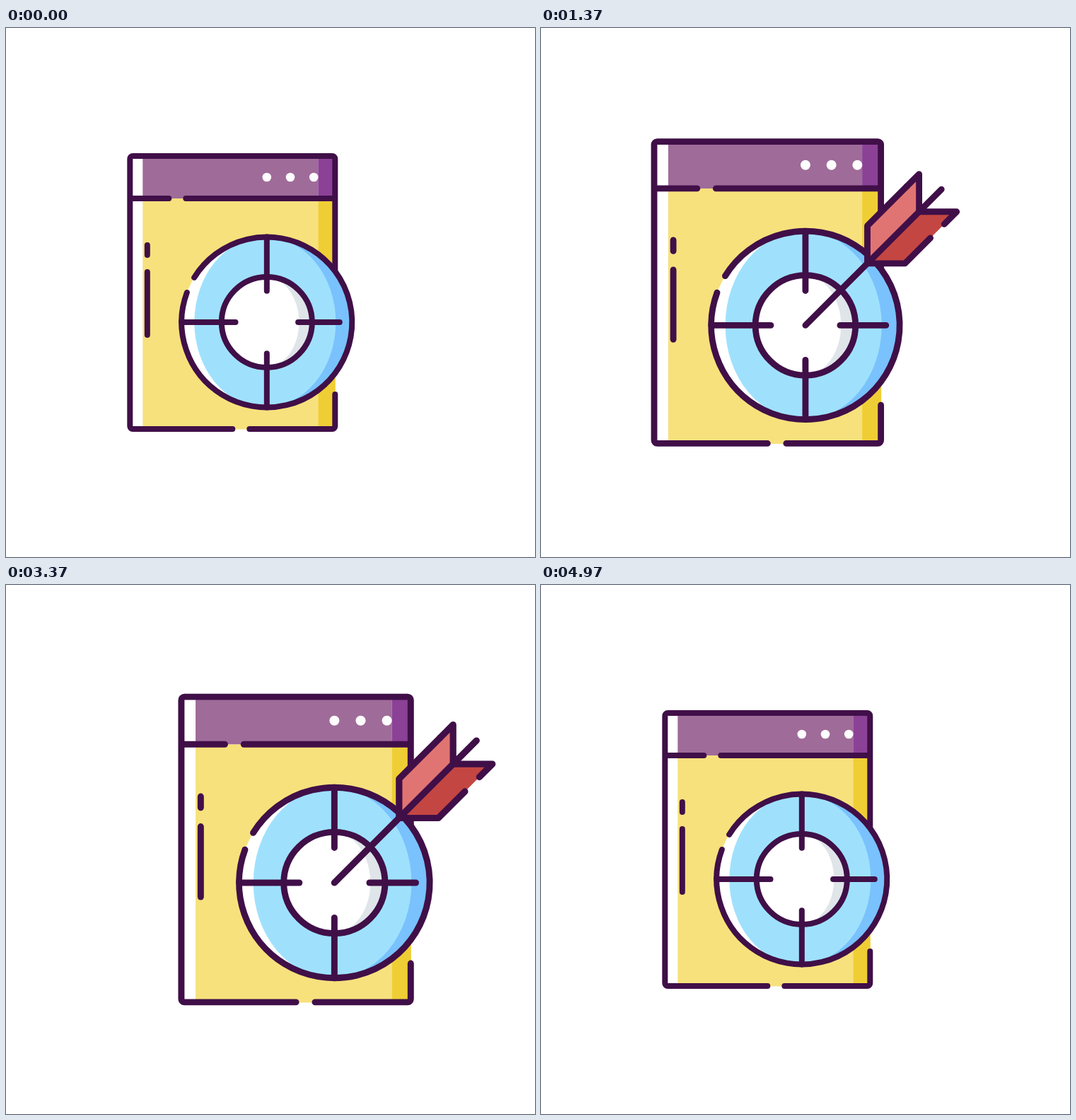
An HTML page with a canvas that plays this animation: 748 px wide and 748 px high, repeating every 5030 ms.

```html
<!DOCTYPE html>
<html lang="en">
<head>
<meta charset="utf-8">
<title>Target</title>
<style>
html, body { margin: 0; width: 100%; height: 100%; overflow: hidden; background: #fff; }
canvas { display: block; width: 748px; height: 748px; }
</style>
</head>
<body>
<canvas id="stage" width="748" height="748"></canvas>
<script>
const ctx = document.getElementById('stage').getContext('2d');
const LOOP = 5030, INK = '#400f48', RIGHT = Math.PI / 2;
const RING = 120.5, HUB = 64;

// Sine step from 0 to 1 between two times
function ease(t, from, to) {
  const u = Math.min(1, Math.max(0, (t - from) / (to - from)));
  return (1 - Math.cos(Math.PI * u)) / 2;
}
// Rises to 1, holds, falls back to 0
function pulse(t, from, top, leave = top, to = 2 * top - from) {
  return ease(t, from, top) - ease(t, leave, to);
}

function group(x, y, scale, angle, draw) {
  ctx.save();
  ctx.translate(x, y);
  ctx.scale(scale, scale);
  ctx.rotate(angle);
  draw();
  ctx.restore();
}
function trace(points) {
  ctx.beginPath();
  for (let i = 0; i < points.length; i += 2) ctx.lineTo(points[i], points[i + 1]);
}
function line(...points) {
  trace(points);
  ctx.stroke();
}
function box(color, x, y, w, h) {
  ctx.fillStyle = color;
  ctx.fillRect(x, y, w, h);
}
function oval(color, x, rx, ry, from = 0, to = 4 * RIGHT) {
  ctx.beginPath();
  ctx.ellipse(x, 0, rx, ry, 0, from, to);
  ctx.fillStyle = color;
  ctx.fill();
}
function arc(radius, from = 0, to = 4 * RIGHT) {
  ctx.beginPath();
  ctx.arc(0, 0, radius, from, to);
  ctx.stroke();
}

function drawCard(t) {
  const left = 175, right = 465, top = 181, bar = 241, bottom = 567;
  const lit = 193, shade = 441;
  box('#fff', left, top, lit - left, bottom - top);
  box('#f7e17c', lit, bar, shade - lit, bottom - bar + .5);
  box('#efce35', shade, bar, right - shade + .5, bottom - bar + .5);
  box('#9f6b99', lit, top, shade - lit, bar - top);
  box('#8b4196', shade, top, right - shade, bar - top);

  ctx.beginPath();
  ctx.moveTo(320, bottom);
  ctx.arcTo(left, bottom, left, top, 4);
  ctx.arcTo(left, top, right, top, 4);
  ctx.arcTo(right, top, right, bottom, 4);
  ctx.lineTo(right, 350);
  ctx.moveTo(right, 518);
  ctx.arcTo(right, bottom, left, bottom, 4);
  ctx.lineTo(344, bottom);
  ctx.stroke();
  line(left + 2, bar, 230, bar);
  line(254, bar, right - 2, bar);

  const lift = 9.5 * pulse(t, 560, 760, 900, 1090);
  line(199.5, 307 - lift, 199.5, 321 - lift);
  line(199.5, 345 - lift, 199.5, 434 - lift);

  for (let i = 0; i < 3; i++) {
    const start = 720 + 90 * i;
    const size = 1 - .65 * pulse(t, start, start + 200);
    group(368.5 + 33.2 * i, 211, size, 0, () => oval('#fff', 0, 6.3, 6.3));
  }
}

function drawTarget(focus) {
  oval('#fff', 0, RING, RING);
  oval('#79c2fd', 0, RING, RING, -RIGHT, RIGHT);
  oval('#9fe1fd', -2.5, 100, RING);
  arc(RING, 2.351 * RIGHT, 6.226 * RIGHT);

  group(0, 0, 1 + .2 * focus, 0, () => {
    oval('#fff', 0, HUB, HUB);
    oval('#dfe5e9', 0, HUB, HUB, -RIGHT, RIGHT);
    oval('#fff', -2, 47.5, HUB);
    arc(HUB);
  });

  const shift = 22.5 * focus;
  for (let i = 0; i < 4; i++) {
    const end = i ? RING : 103;
    group(0, 0, 1, i * RIGHT, () => line(44.3 - shift, 0, end - shift, 0));
  }
}

// Drawn along the x axis with the tip at 0
function drawArrow() {
  const wing = 34, base = 112, notch = 205.5;
  for (const side of [-1, 1]) {
    const edge = side * wing;
    trace([base, 0, base + wing, edge, notch + wing, edge, notch, 0]);
    ctx.fillStyle = side < 0 ? '#e07472' : '#c44642';
    ctx.fill();
    const gap = side < 0 ? 0 : 25;
    line(base, 0, base + wing, edge, 217 - gap, edge);
    line(217, edge, notch + wing, edge, notch, 0);
  }
  line(0, 0, 246, 0);
}

function drawSparkles(t) {
  const spots = [[271, 283], [551.5, 447.5], [527.5, 374.5], [509, 526.5]];
  ctx.lineWidth = 3;
  spots.forEach(([x, y], i) => {
    const start = 710 + 50 * i, size = pulse(t, start, start + 200);
    if (size > 0) group(x, y, size, 0, () => {
      line(-6, 0, 6, 0);
      line(0, -6, 0, 6);
    });
  });
}

function render(t) {
  const zoom = 1 + .22 * ease(t, 20, 540) - .12 * ease(t, 540, 870) + .016 * ease(t, 870, 2110)
    + .16 * (pulse(t, 2110, 2660, 2860, 3415) + ease(t, 3580, 4130)) - .276 * ease(t, 4230, 4970);
  const x = 320.3 + 90 * pulse(t, 2110, 3410, 3570, 4910);
  const focus = pulse(t, 300, 700, 880, 1060);
  const grow = 1 + .17 * focus;
  const swell = 1 + .155 * pulse(t, 2110, 2800, 2800, 3620) + .05 * ease(t, 3620, 4300);
  const arrow = grow * swell * pulse(t, 250, 640, 4300, 4760);
  const pull = 53 * (1 - ease(t, 680, 950));

  box('#fff', 0, 0, 748, 748);
  ctx.strokeStyle = INK;
  ctx.lineWidth = 8;
  ctx.lineCap = ctx.lineJoin = 'round';
  group(x, 374, zoom, 0, () => {
    ctx.translate(-320, -374);
    drawCard(t);
    group(368.5, 416, grow, 0, () => drawTarget(focus));
    if (arrow > .001) group(368.5 + 1.2 * pull, 416 - pull, arrow, -RIGHT / 2, drawArrow);
    drawSparkles(t);
  });
}

function tick() {
  render(performance.now() % LOOP);
  requestAnimationFrame(tick);
}
tick();
</script>
</body>
</html>
```
